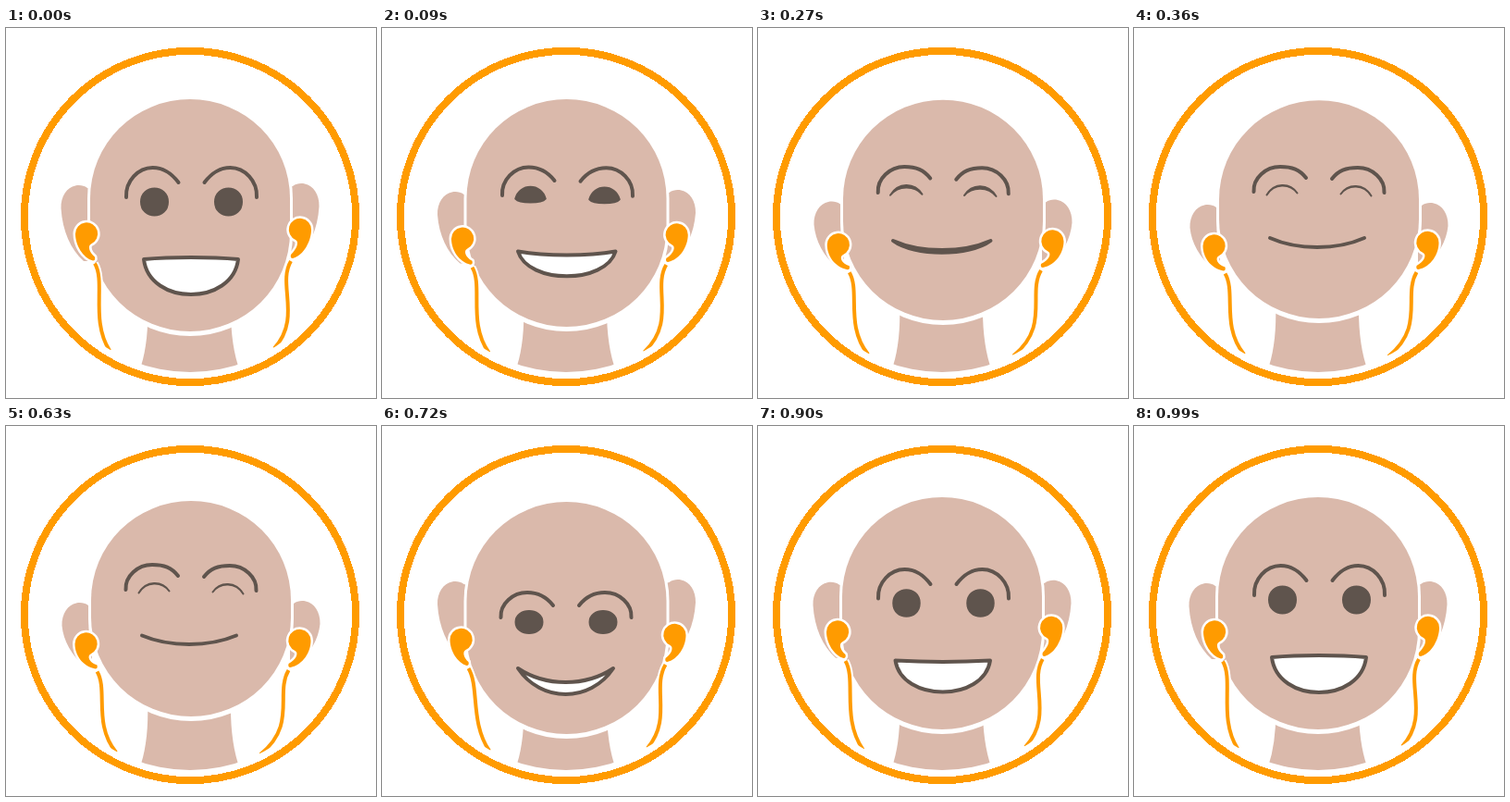
Animation of 400 by 400 pixels, one loop 1.44 s. Source, as an HTML page:

```html
<!DOCTYPE html>
<html lang="en">
<head>
<meta charset="utf-8">
<title>Smiling listener</title>
<style>
  html, body { margin: 0; width: 100%; height: 100%; overflow: hidden; background: #fff; }
  svg { display: block; width: 100%; height: 100%; }
  .skin { fill: #dab9ab; }
  .white { fill: #fff; }
  .line { fill: none; stroke: #5f544d; stroke-width: 4; stroke-linecap: round; stroke-linejoin: round; }
  .mouth { fill: #fff; }
  .eye { fill: #5f544d; stroke-width: 2; }
  .bud { fill: #ff9b00; stroke: #fff; stroke-width: 5; paint-order: stroke; stroke-linejoin: round; }
  .cable { fill: none; stroke: #ff9b00; stroke-width: 4; }
  .gap { fill: none; stroke: #fff; stroke-width: 8; }
</style>
</head>
<body>
<svg viewBox="0 0 400 400">
  <clipPath id="disc"><circle cx="199" cy="204" r="168"/></clipPath>
  <circle cx="199" cy="204" r="179.2" fill="none" stroke="#ff9b00" stroke-width="8" shape-rendering="crispEdges"/>
  <g id="scene" clip-path="url(#disc)"></g>
</svg>
<script>
const LOOP = 1440;

// head: centre x, top, bottom     ear: top, height
// budL, budR: bulb x, y, tip dx, dy, cable bend x, cable end x
// brow: face centre, outer y, peak y, inner y, drop of the right side
// eye: y, half width, rise, fall, inset, tilt
// mouth: centre, half width, y, upper dip, lower dip, inset
const open = {
  head: [199, 77, 328], ear: [170, 82],
  budL: [87, 222.5, 8, 29, 91, 112], budR: [318, 218, 9, 31, 320, 290],
  brow: [200.5, 183, 151, 167, 0],
  eye: [188, 14.5, 14.5, 14.5, 0, 0],
  mouth: [200, 51, 250, -2, 38, 6]
};
const squint = {
  head: [200, 77, 318], ear: [184, 73],
  budL: [87, 233, 11, 27, 94, 119], budR: [319.5, 229, 12, 28, 317, 277],
  brow: [200.5, 179, 150, 163, 1.5],
  eye: [181, 18, 11, -6.5, 9, 0],
  mouth: [199.5, 54.5, 233, 10, 15.7, 16]
};
const shut = {
  head: [200, 78.3, 314], ear: [191, 68],
  budL: [86.5, 235.5, 11, 27, 94, 119], budR: [317.5, 232, 11, 29, 315, 275],
  brow: [200, 177, 150, 162, 1],
  eye: [179.5, 16.5, 9.5, -9, 8, 1],
  mouth: [198, 51, 227, 10, 10, 30]
};
const dip = { ...shut, head: [200, 81, 314], mouth: [198, 51, 226.5, 9.5, 9.5, 30] };
const waking = {
  head: [199.5, 82, 333], ear: [168, 82],
  budL: [85.5, 231, 7, 28, 95, 116], budR: [316.5, 226, 9, 29, 314, 287],
  brow: [199, 207, 180, 194, 0],
  eye: [212, 14.5, 12, 12, 0, 0],
  mouth: [198.5, 51.5, 262, 15, 28, 25]
};
const rising = {
  ...open, ear: [167.5, 82],
  budL: [85, 222.5, 7, 28, 89, 115], budR: [316.5, 218, 8, 31, 320, 288],
  brow: [200.5, 190, 159, 175, 0],
  eye: [195, 14, 14, 14, 0, 0],
  mouth: [199.5, 51.5, 257, 4.5, 30, 8]
};

function mix(a, b) {
  const out = {};
  for (const k in a) out[k] = a[k].map((v, i) => (v + b[k][i]) / 2);
  return out;
}

const steps = [
  [0, open], [90, mix(open, squint)], [180, squint], [270, mix(squint, shut)],
  [360, shut], [630, dip], [720, waking], [810, rising],
  [900, mix(rising, open)], [990, open]
];

const scene = document.getElementById('scene');
function add(tag, cls) {
  const el = document.createElementNS('http://www.w3.org/2000/svg', tag);
  el.setAttribute('class', cls);
  return scene.appendChild(el);
}
function set(el, attrs) {
  for (const k in attrs) el.setAttribute(k, attrs[k]);
}
const pair = (tag, cls) => [add(tag, cls), add(tag, cls)];

const ears = pair('path', 'skin');
const neck = add('path', 'skin');
const rim = add('rect', 'white');
const head = add('rect', 'skin');
const gaps = pair('path', 'gap');
const cables = pair('path', 'cable');
const buds = pair('path', 'bud');
const brows = pair('path', 'line');
const eyes = pair('path', 'line eye');
const mouth = add('path', 'line mouth');

set(neck, { d: 'M153 295Q155 342 144 371L140 390H258L253 371Q242 342 243 295Z' });

function earPath(h) {
  return 'M4 4L0 3C-4 0 -9 -.5 -13 .5C-22 2 -29 12 -28.5 25' +
    `C-27 ${h * .6} -18 ${h * .85} -4 ${h}L4 ${h}Z`;
}

function budPath(tx, ty) {
  return `M-12 0A12.1 12.1 0 1 1 5 11C1 13 3 20 ${tx + 1} ${ty - 4}` +
    `Q${tx + 2} ${ty} ${tx - 1} ${ty}C-4 ${ty - 3} -12 12 -12 0Z`;
}

function cablePath([x, y, tx, ty, bend, end], side) {
  const sx = x + side * (tx + 1), sy = y + ty + 3;
  const endY = 204 + Math.sqrt(169 ** 2 - (end - 199) ** 2);
  const [dx, dy] = side > 0 ? [12, 20] : [-15, 25];
  return `M${sx} ${sy}C${sx + dx} ${sy + dy} ${bend} ${sy + (endY - sy) * .65} ${end} ${endY}`;
}

function browPath([, outer, peak, inner]) {
  return `M-70.5 ${outer}C-71.5 ${outer - (outer - peak) * .55} -57.5 ${peak} -42 ${peak}` +
    `C-29 ${peak} -21 ${inner - 9} -14 ${inner}`;
}

function eyePath([, w, up, down, inset, tilt]) {
  const k = 4 / 3, c = w - inset;
  return `M${-w} ${tilt}C${-c} ${-up * k} ${c} ${-up * k} ${w} ${-tilt}` +
    `C${c} ${down * k} ${-c} ${down * k} ${-w} ${tilt}Z`;
}

function mouthPath([x, w, y, top, low, inset]) {
  const t = y + top * 4 / 3, b = y + low * 4 / 3, l = x - w, r = x + w;
  return `M${l} ${y}C${l + 30} ${t} ${r - 30} ${t} ${r} ${y}` +
    `C${r - inset} ${b} ${l + inset} ${b} ${l} ${y}Z`;
}

function draw(p) {
  const [hx, top, bottom] = p.head;
  const [face, , , , drop] = p.brow;
  set(head, { x: hx - 108, y: top, width: 216, height: bottom - top, rx: 108, ry: 107 });
  set(rim, { x: hx - 111, y: top - 3, width: 222, height: bottom - top + 8, rx: 111, ry: 110 });
  [1, -1].forEach((side, i) => {
    const bud = side > 0 ? p.budL : p.budR;
    const flip = `scale(${side} 1)`;
    const cable = cablePath(bud, side);
    set(ears[i], { d: earPath(p.ear[1]), transform: `translate(${hx - side * 111} ${p.ear[0] - i * 2})${flip}` });
    set(gaps[i], { d: cable });
    set(cables[i], { d: cable });
    set(buds[i], { d: budPath(bud[2], bud[3]), transform: `translate(${bud[0]} ${bud[1]})${flip}` });
    set(brows[i], { d: browPath(p.brow), transform: `translate(${face} ${i * drop})${flip}` });
    set(eyes[i], { d: eyePath(p.eye), transform: `translate(${face - side * 40} ${p.eye[0] + i * drop})${flip}` });
  });
  set(mouth, { d: mouthPath(p.mouth) });
}

let shown = null;
function tick() {
  const t = performance.now() % LOOP;
  const pose = steps.findLast(s => s[0] <= t)[1];
  if (pose !== shown) draw(shown = pose);
  requestAnimationFrame(tick);
}
tick();
</script>
</body>
</html>
```
